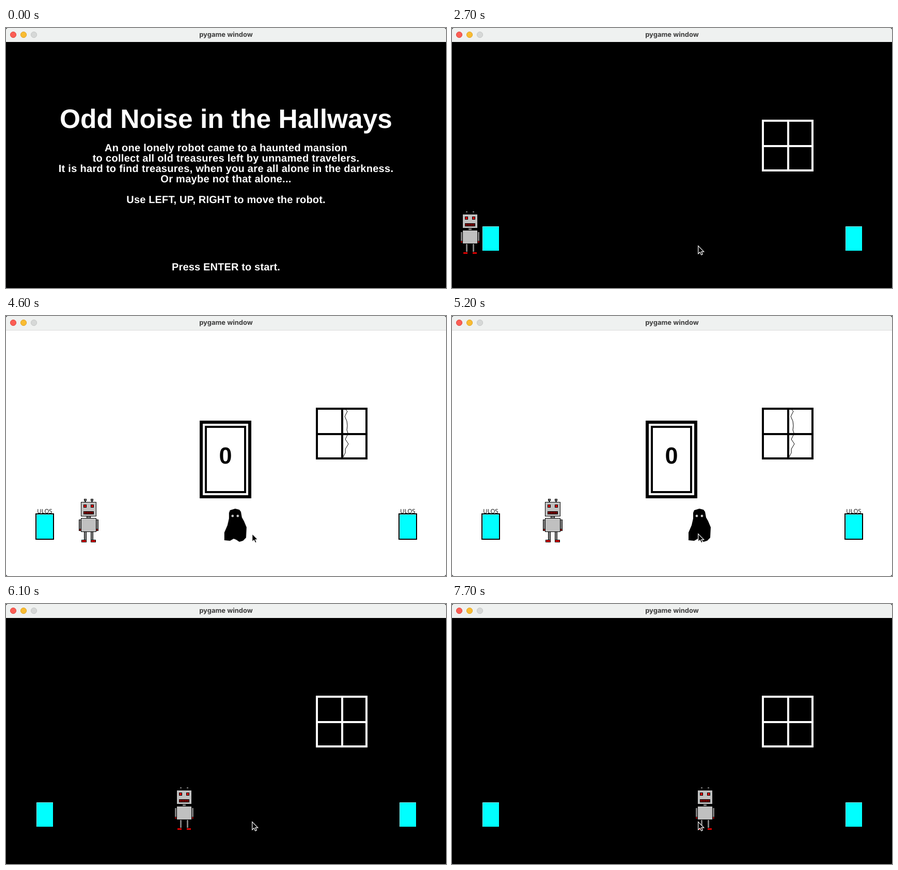
Recreate the animation shown at these times as an HTML page. Size 852 by 502 pixels, loop 8 s.

```html
<!DOCTYPE html>
<html lang="en">
<head>
<meta charset="utf-8">
<title>pygame window</title>
<style>
  html, body { margin: 0; width: 100%; height: 100%; overflow: hidden; background: #15171a; }
  svg { display: block; width: 852px; height: 502px; text-rendering: geometricPrecision; }
  text { text-anchor: middle; }

  .caption { font: 700 13px Inter, sans-serif; fill: #3c3c3c; }
  .intro { font: 700 20px "Liberation Sans", Arial, sans-serif; fill: #fff; }
  .heading { font-size: 51.5px; }
  .prose { letter-spacing: .3px; }
  .prompt { letter-spacing: .15px; }
  .sign { font: 500 11.5px "Open Sans", sans-serif; }
  .score { font: 700 45px "Liberation Sans", Arial, sans-serif; }

  .room { fill: #000; color: #fff; animation: room 8s step-end infinite; }
  .pane { fill: none; stroke: currentColor; stroke-width: 4; }
  .intro { animation: intro 8s step-end infinite; }
  .game { animation: game 8s step-end infinite; }
  .lit { animation: lit 8s step-end infinite; }
  .cursor { animation: cursor 8s step-end infinite; }
  .ghost { animation: drift 8s step-end infinite; }
  .robot { animation: walk 8s step-end infinite; }

  @keyframes intro { 0% { visibility: visible; } 20%, 100% { visibility: hidden; } }
  @keyframes game { 0% { visibility: hidden; } 20%, 100% { visibility: visible; } }
  @keyframes cursor { 0% { visibility: hidden; } 1.25%, 100% { visibility: visible; } }
  @keyframes lit {
    0%, 76.25%, 100% { visibility: hidden; }
    57.5% { visibility: visible; }
  }
  @keyframes room {
    0%, 76.25%, 100% { fill: #000; color: #fff; }
    57.5% { fill: #fff; color: #000; }
  }
  @keyframes drift {
    0% { transform: translateX(-35.2px); }
    57.5% { transform: translateX(-35.2px); animation-timing-function: steps(15); }
    76.25%, 100% { transform: translateX(52.8px); }
  }
  @keyframes walk {
    0% { transform: translate(0, 352px); }
    33.75% { transform: translate(10px, 352px); }
    35% { transform: translate(15px, 352px); }
    38.75% { transform: translate(35px, 352px); }
    40% { transform: translate(55px, 352px); }
    42.5% { transform: translate(75px, 352px); }
    43.75% { transform: translate(95px, 352px); }
    50% { transform: translate(115px, 352px); }
    51.25% { transform: translate(135px, 352px); }
    60% { transform: translate(155px, 352px); }
    61.25% { transform: translate(170px, 352px); }
    65% { transform: translate(170px, 352px); animation-timing-function: steps(8); }
    75% { transform: translate(320px, 352px); }
    77.5% { transform: translate(345px, 352px); }
    78.75% { transform: translate(365px, 352px); }
    80% { transform: translate(370px, 352px); }
    85% { transform: translate(390px, 352px); }
    86.25% { transform: translate(405px, 352px); }
    88.75% { transform: translate(425px, 352px); }
    90% { transform: translate(445px, 352px); }
    96.25%, 100% { transform: translate(465px, 352px); }
  }
</style>
</head>
<body>
<svg viewBox="0 0 852 502">
  <defs>
    <clipPath id="frame"><rect width="852" height="502" rx="4"/></clipPath>
    <g id="door">
      <rect x="1" y="1" width="34" height="49" fill="#0ff" stroke="#000" stroke-width="2"/>
      <path d="M2.5 49V2.5H34" fill="none" stroke="#8ff"/>
      <text class="sign" x="18" y="-.5">ULOS</text>
    </g>
    <g id="limbs" stroke="#000">
      <rect x="16.5" y="1.5" width="4" height="3" fill="#808080"/>
      <path d="M18.5 4.5V7" stroke-width="2"/>
      <rect x="16.5" y="64.5" width="4" height="16" fill="#808080"/>
      <rect x="11.5" y="80.5" width="9" height="4" fill="#e00000"/>
      <rect x="6.5" y="41.5" width="4" height="18" fill="#808080"/>
      <rect x="6.5" y="59.5" width="4" height="3" fill="#c00000"/>
    </g>
    <g id="eye">
      <rect width="6" height="6"/>
      <rect x="1" y="1" width="4" height="4" fill="#e00000"/>
    </g>
  </defs>

  <g clip-path="url(#frame)">
    <g class="room">
      <rect y="27" width="852" height="475"/>
      <g class="game">
        <path class="pane" d="M602 179h96v96h-96zM651 179v96M602 228h96"/>
      </g>
    </g>

    <rect width="852" height="27" fill="#eff1f0"/>
    <circle cx="14" cy="13" r="5.6" fill="#fb5e55" stroke="#e04a42"/>
    <circle cx="34" cy="13" r="5.6" fill="#f9bc32" stroke="#dfa52a"/>
    <circle cx="54" cy="13" r="5.6" fill="#d6d8d7" stroke="#c6c8c7"/>
    <text class="caption" x="426" y="17">pygame window</text>

    <g class="intro">
      <text class="heading" x="426" y="193">Odd Noise in the Hallways</text>
      <g class="prose">
        <text x="426" y="238">An one lonely robot came to a haunted mansion</text>
        <text x="426" y="258">to collect all old treasures left by unnamed travelers.</text>
        <text x="426" y="278">It is hard to find treasures, when you are all alone in the darkness.</text>
        <text x="426" y="298">Or maybe not that alone...</text>
      </g>
      <g class="prompt">
        <text x="426" y="338">Use LEFT, UP, RIGHT to move the robot.</text>
        <text x="426" y="468">Press ENTER to start.</text>
      </g>
    </g>

    <g class="lit">
      <path d="M0 27.5H852" stroke="#dcdcdc"/>
      <g fill="none" stroke="#000">
        <rect x="378" y="205" width="94" height="144" stroke-width="6"/>
        <rect x="387" y="214" width="76" height="126" stroke-width="4"/>
        <path d="M657 180l4 4-5 10 4 9 1 9-1 8 2 6M661 230l-4 8 6 9-6 10v7l-4 8"/>
      </g>
      <text class="score" x="425" y="285">0</text>
      <g class="ghost">
        <path d="M458 418V433L469 434L476 430L481 432L487 436L494 434L500 428L501 408L496 396L492 389L490 378L487 374L479 372L469 375L467 380V391L464 404Z"/>
        <g fill="#fff"><circle cx="474" cy="386" r="2.2"/><circle cx="484" cy="386" r="2.2"/></g>
        <circle cx="474.3" cy="386" r=".8"/><circle cx="484.3" cy="386" r=".8"/>
      </g>
    </g>

    <g class="game">
      <use href="#door" x="57" y="381"/>
      <use href="#door" x="760" y="381"/>
      <g class="robot">
        <use href="#limbs"/>
        <use href="#limbs" transform="matrix(-1 0 0 1 50 0)"/>
        <g stroke="#000">
          <rect x="21.5" y="34.5" width="7" height="4" fill="#808080"/>
          <rect x="10.5" y="7.5" width="29" height="27" fill="#c0c0c0"/>
          <rect x="10.5" y="38.5" width="29" height="26" fill="#c0c0c0"/>
        </g>
        <use href="#eye" x="15" y="12"/>
        <use href="#eye" x="29" y="12"/>
        <rect x="15" y="25" width="20" height="6"/>
        <path d="M16 28H34" stroke="#b00000" stroke-width="4" stroke-dasharray="1.5 1"/>
      </g>
    </g>

    <path class="cursor" d="M476.7 420.7V436L480.2 432.8L482.7 438L485.2 437L483 431.8H487.7Z" stroke="#fff" stroke-width="1.2"/>
  </g>
</svg>
</body>
</html>
```
